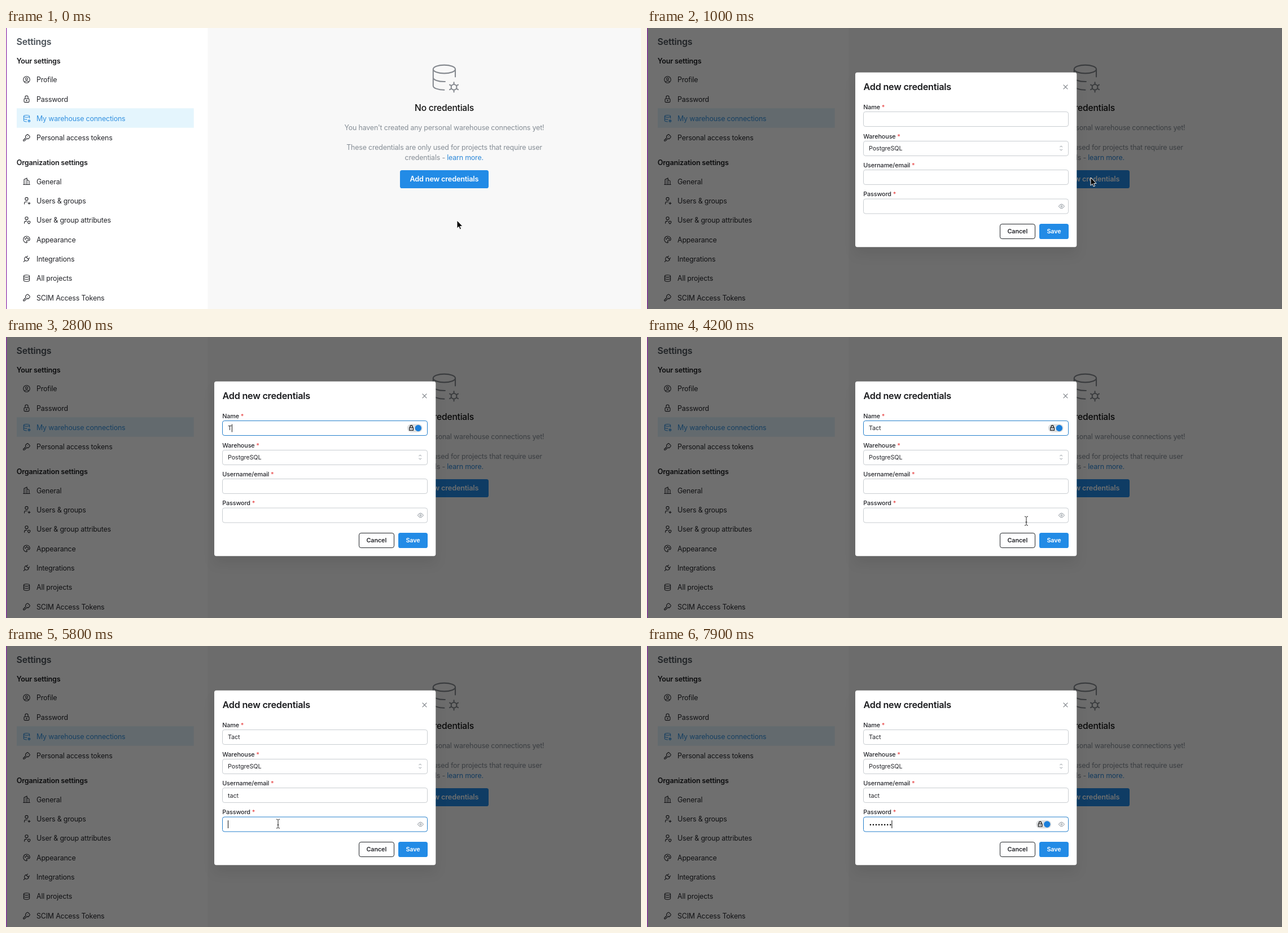
Animation of 1125 by 498 pixels, one loop 8 s. Source, as an HTML page:

```html
<!DOCTYPE html>
<html lang="en">
<head>
<meta charset="utf-8">
<title>Add new credentials</title>
<style>
  html, body { margin: 0; width: 100%; height: 100%; overflow: hidden; background: #f8f8f8; }
  svg { display: block; }
  text { font-family: Inter, sans-serif; font-size: 12.4px; letter-spacing: -.014em; fill: #25262b; white-space: pre; }
  .icon { fill: none; stroke: #25262b; stroke-width: 1.7; stroke-linecap: round; stroke-linejoin: round; }
  .active { fill: #3391e0; }
  .icon.active { fill: none; stroke: #3391e0; }
  .page { font-size: 15.9px; font-weight: 600; fill: #495057; }
  .group { font-size: 12.55px; font-weight: 600; fill: #1a1b1e; }
  .mid { text-anchor: middle; }
  .empty { font-size: 15.6px; font-weight: 500; fill: #111; }
  .note { fill: #868e96; }
  .link { fill: #2b87d8; }
  .cta { font-size: 12.7px; font-weight: 600; fill: #fff; }
  .title { font-size: 16.2px; font-weight: 600; fill: #1a1b1e; }
  .small { font-size: 10.8px; letter-spacing: -.01em; }
  .label { font-weight: 500; }
  .bold { font-weight: 600; }
  .star { fill: #e84a4a; }
  .box { fill: #fff; stroke: #c9cdd1; }
  .box.focus { stroke: #2680cc; }
</style>
</head>
<body>
<svg width="1125" height="498" viewBox="0 0 1125 498">
  <rect width="1125" height="498" fill="#f8f8f8"/>
  <rect width="357.5" height="498" fill="#fff"/>
  <text class="page" x="18.6" y="29.8">Settings</text>
  <rect x="19" y="142.3" width="313.7" height="34.5" fill="#e4f5fd"/>
  <g id="nav"></g>

  <g id="bigIcon" transform="translate(747 58.3) scale(2.45)"></g>
  <text class="mid empty" x="776.5" y="147.2">No credentials</text>
  <text class="mid note" x="776.5" y="181.2">You haven't created any personal warehouse connections yet!</text>
  <text class="mid note" x="776.5" y="216">These credentials are only used for projects that require user</text>
  <text class="mid note" x="776.2" y="233.9">credentials - <tspan class="link">learn more.</tspan></text>
  <g id="cta">
    <rect id="ctaBox" x="698" y="252" width="157" height="32" rx="3.6"/>
    <text class="mid cta" x="776.4" y="272.4">Add new credentials</text>
  </g>

  <g id="modal">
    <rect width="1125" height="498" fill="#000" opacity=".565"/>
    <rect x="369" y="78.7" width="392.3" height="309.5" rx="3.6" fill="#fff" style="filter:drop-shadow(0 14px 10px #0001)"/>
    <text class="title" x="383.5" y="110">Add new credentials</text>
    <path d="M737.7 100.7l7.6 7.6m0-7.6l-7.6 7.6" stroke="#777c82" stroke-width="1.1"/>
    <g id="fields"></g>
    <text class="small" x="393" y="217">PostgreSQL</text>
    <path d="M731.5 211.2l2.2-2.2 2.2 2.2m-4.4 3.6l2.2 2.2 2.2-2.2" fill="none" stroke="#868e96"/>
    <g fill="none" stroke="#868e96">
      <path d="M729.4 316q5-7.6 10 0q-5 7.6-10 0z"/>
      <circle cx="734.4" cy="316" r="1.4"/>
    </g>
    <rect x="625.5" y="347.5" width="62" height="26" rx="3.6" fill="#fff" stroke="#212529"/>
    <text class="mid small bold" x="656.3" y="364.2">Cancel</text>
    <rect x="695" y="347" width="52" height="27" rx="3.6" fill="#228be6"/>
    <text class="mid small bold" x="721" y="364.2" style="fill:#fff">Save</text>

    <text id="nameText" class="small" x="393" y="165"></text>
    <text id="userText" class="small" x="393" y="268.5"></text>
    <g id="dots"></g>
    <rect id="caret" width="1" height="14" fill="#111"/>
    <g id="badge">
      <rect x="-13.3" y="-7.3" width="27" height="14.6" rx="7.3" fill="#dcdee0"/>
      <path d="M-9.2 -1h6.6v5h-6.6zM-8 -1v-1.7a2.1 2.1 0 0 1 4.2 0v1.7M-5.9 1v1" fill="none" stroke="#111" stroke-width="1.2" stroke-linejoin="round"/>
      <circle cx="6.3" r="5.7" fill="#1a7fdc"/>
    </g>
  </g>

  <g id="pointer">
    <path id="arrow" d="M0 0v14.2l3.2-3 2 4.8 2.3-1-2-4.6h4.5z" fill="#000" stroke="#fff"/>
    <path id="beam" d="M-3 -8q2.5 0 3 1.5q.5-1.5 3-1.5M-3 8q2.5 0 3-1.5q.5 1.5 3 1.5M0-6.5v13M-1.5 2h3" fill="none" stroke="#222"/>
  </g>
  <rect width="1.2" height="498" fill="#8a2ba6"/>
</svg>
<script>
const $ = id => document.getElementById(id);
const LOOP = 8000, STEP = 100;

const ring = (x, y, r) => `M${x - r} ${y}a${r} ${r} 0 1 0 ${2 * r} 0a${r} ${r} 0 1 0 ${-2 * r} 0`;
const disc = 'M4 6a8 3 0 1 0 16 0a8 3 0 1 0-16 0';
const spokes = [0, 1, 2, 3, 4, 5].map(i => {
  const a = Math.PI * (i / 3 + .5), c = Math.cos(a), s = Math.sin(a);
  return `M${19 + 2 * c} ${19 + 2 * s}L${19 + 3.5 * c} ${19 + 3.5 * s}`;
}).join('');
const ICONS = {
  profile: ring(12, 12, 9) + ring(12, 10, 3) + 'M6.2 18.8a4 4 0 0 1 3.8-2.8h4a4 4 0 0 1 3.8 2.8',
  lock: 'M7 11h10a2 2 0 0 1 2 2v6a2 2 0 0 1-2 2H7a2 2 0 0 1-2-2v-6a2 2 0 0 1 2-2zM8 11V7a4 4 0 0 1 8 0v4' + ring(12, 16, 1),
  store: disc + 'M4 6v6c0 1.66 3.58 3 8 3h.6M20 11.5V6M4 12v6c0 1.66 3.58 3 8 3' + ring(19, 19, 2) + spokes,
  key: 'M16.56 3.84l3.6 3.6a2.88 2.88 0 0 1 0 4.07l-2.64 2.64a2.88 2.88 0 0 1-4.07 0l-.3-.3-6.56 6.56a2 2 0 0 1-1.24.58L4 21a1 1 0 0 1-1-1v-1.2a2 2 0 0 1 .6-1.4L4 17h2v-2h2v-2l2.14-2.14-.3-.3a2.88 2.88 0 0 1 0-4.07l2.64-2.64a2.88 2.88 0 0 1 4.07 0zM15 9h.01',
  building: 'M3 21h18M5 21V7l8-4v18M19 21V11l-6-4M9 9v.01M9 12v.01M9 15v.01M9 18v.01',
  userPlus: ring(12, 7, 4) + 'M16 19h6M19 16v6M6 21v-2a4 4 0 0 1 4-4h4',
  userShield: ring(12, 7, 4) + 'M6 21v-2a4 4 0 0 1 4-4h2M22 16c0 4-2.5 6-3.5 6S15 20 15 16c1 0 2.5-.5 3.5-1.5 1 1 2.5 1.5 3.5 1.5z',
  palette: 'M12 21a9 9 0 0 1 0-18c5 0 9 3.6 9 8 0 2.2-2 4-4.5 4H14a2 2 0 0 0-1 3.75A1.3 1.3 0 0 1 12 21' + ring(8.5, 10.5, 1) + ring(12.5, 7.5, 1) + ring(16.5, 10.5, 1),
  plug: 'M9.8 6L18 14.2l-2 2a5.8 5.8 0 1 1-8.2-8.2zM4 20l3.5-3.5M15 4l-3.5 3.5M20 9l-3.5 3.5',
  database: disc + 'M4 6v6a8 3 0 0 0 16 0V6M4 12v6a8 3 0 0 0 16 0v-6'
};

const GROUPS = [
  { title: 'Your settings', y: 62.5, first: 91.8, items: [
    ['profile', 'Profile'], ['lock', 'Password'],
    ['store', 'My warehouse connections', 'active'], ['key', 'Personal access tokens']] },
  { title: 'Organization settings', y: 242.8, first: 272.1, items: [
    ['building', 'General'], ['userPlus', 'Users &amp; groups'],
    ['userShield', 'User &amp; group attributes'], ['palette', 'Appearance'],
    ['plug', 'Integrations'], ['database', 'All projects'], ['key', 'SCIM Access Tokens']] }
];
$('nav').innerHTML = GROUPS.map(g =>
  `<text class="group" x="18.8" y="${g.y}">${g.title}</text>` +
  g.items.map(([icon, label, cls = ''], i) => {
    const y = g.first + i * 34.35;
    return `<path class="icon ${cls}" transform="translate(28.8 ${y - 8}) scale(.64)" d="${ICONS[icon]}"/>
      <text class="${cls}" x="54" y="${y + 4.5}">${label}</text>`;
  }).join('')).join('');
$('bigIcon').innerHTML = `<path class="icon" d="${ICONS.store}" style="stroke:#868a90;stroke-width:.85"/>`;

const TOPS = [148.5, 200.5, 251.5, 303];
$('fields').innerHTML = ['Name', 'Warehouse', 'Username/email', 'Password'].map((label, i) =>
  `<text class="small label" x="383.2" y="${TOPS[i] - 4.6}">${label} <tspan class="star">*</tspan></text>
   <rect class="box" x="383.5" y="${TOPS[i]}" width="363" height="26" rx="3.6"/>`).join('');
const boxes = [...document.querySelectorAll('.box')];
const PITCH = 5.05;
$('dots').innerHTML = Array.from({ length: 8 }, (_, i) =>
  `<circle cx="${395.9 + i * PITCH}" cy="316.8" r="1.25"/>`).join('');
const dots = [...$('dots').children];

// Each entry: field index, focus time, key press times
const ENTRIES = [
  { field: 0, focus: 1900, keys: [2800, 3100, 3200, 3400], text: 'Tact', el: $('nameText') },
  { field: 2, focus: 4700, keys: [5100, 5200, 5300, 5400], text: 'tact', el: $('userText') },
  { field: 3, focus: 5800, keys: [6600, 6800, 7100, 7200, 7400, 7500, 7600, 7900] }
];
const HIDDEN = [[2800, 3800], [4900, 5400], [6600, LOOP]];
const PATH = [
  [0, 799, 341], [400, 822, 334], [600, 822, 334], [850, 786, 265], [1000, 786, 265],
  [1500, 546, 177], [1700, 547, 166], [3700, 547, 166], [4100, 672, 326], [4200, 672, 326],
  [4600, 482, 265], [5400, 482, 266], [5600, 482, 315], [LOOP, 482, 315]
];

function pointerAt(t) {
  const i = PATH.findIndex(p => p[0] > t);
  const [t0, x0, y0] = PATH[i - 1], [t1, x1, y1] = PATH[i];
  const k = (t - t0) / (t1 - t0), e = k * k * (3 - 2 * k);
  return [x0 + (x1 - x0) * e, y0 + (y1 - y0) * e];
}

const show = (el, on) => { el.style.display = on ? '' : 'none'; };

function draw(t) {
  const open = t >= 1000;
  const [x, y] = pointerAt(t);
  const hover = !open && x > 698 && x < 855 && y > 252 && y < 284;
  $('ctaBox').setAttribute('fill', hover ? '#1c7ed6' : '#228be6');
  $('cta').setAttribute('transform', `translate(0 ${t >= 900 && !open ? 1 : 0})`);
  show($('modal'), open);

  const inInput = open && x > 383 && x < 747 && [0, 2, 3].some(i => y > TOPS[i] && y < TOPS[i] + 26);
  $('pointer').setAttribute('transform', `translate(${x} ${y})`);
  show($('pointer'), !HIDDEN.some(([a, b]) => t >= a && t < b));
  show($('arrow'), !inInput);
  show($('beam'), inInput);

  let current = null;
  for (const e of ENTRIES) {
    e.count = e.keys.filter(k => k <= t).length;
    if (e.el) e.el.textContent = e.text.slice(0, e.count);
    else dots.forEach((d, i) => show(d, i < e.count));
    if (t >= e.focus) current = e;
  }
  boxes.forEach((b, i) => b.classList.toggle('focus', !!current && current.field === i));
  show($('badge'), current);
  show($('caret'), current);
  if (!current) return;

  const { field, focus, keys, count, el } = current;
  const mid = TOPS[field] + 13;
  const width = el ? (count ? el.getComputedTextLength() : 0) : count * PITCH;
  const last = count ? keys[count - 1] : focus;
  $('caret').setAttribute('x', 393 + width);
  $('caret').setAttribute('y', mid - 7);
  show($('caret'), (t - last) % 1000 < 500);
  $('badge').setAttribute('transform', `translate(${field === 3 ? 702.5 : 724} ${mid})`);
  $('badge').setAttribute('opacity', Math.min(1, (t - focus) / 200));
}

function tick() {
  draw(Math.floor(performance.now() % LOOP / STEP) * STEP);
  requestAnimationFrame(tick);
}
tick();
</script>
</body>
</html>
```
